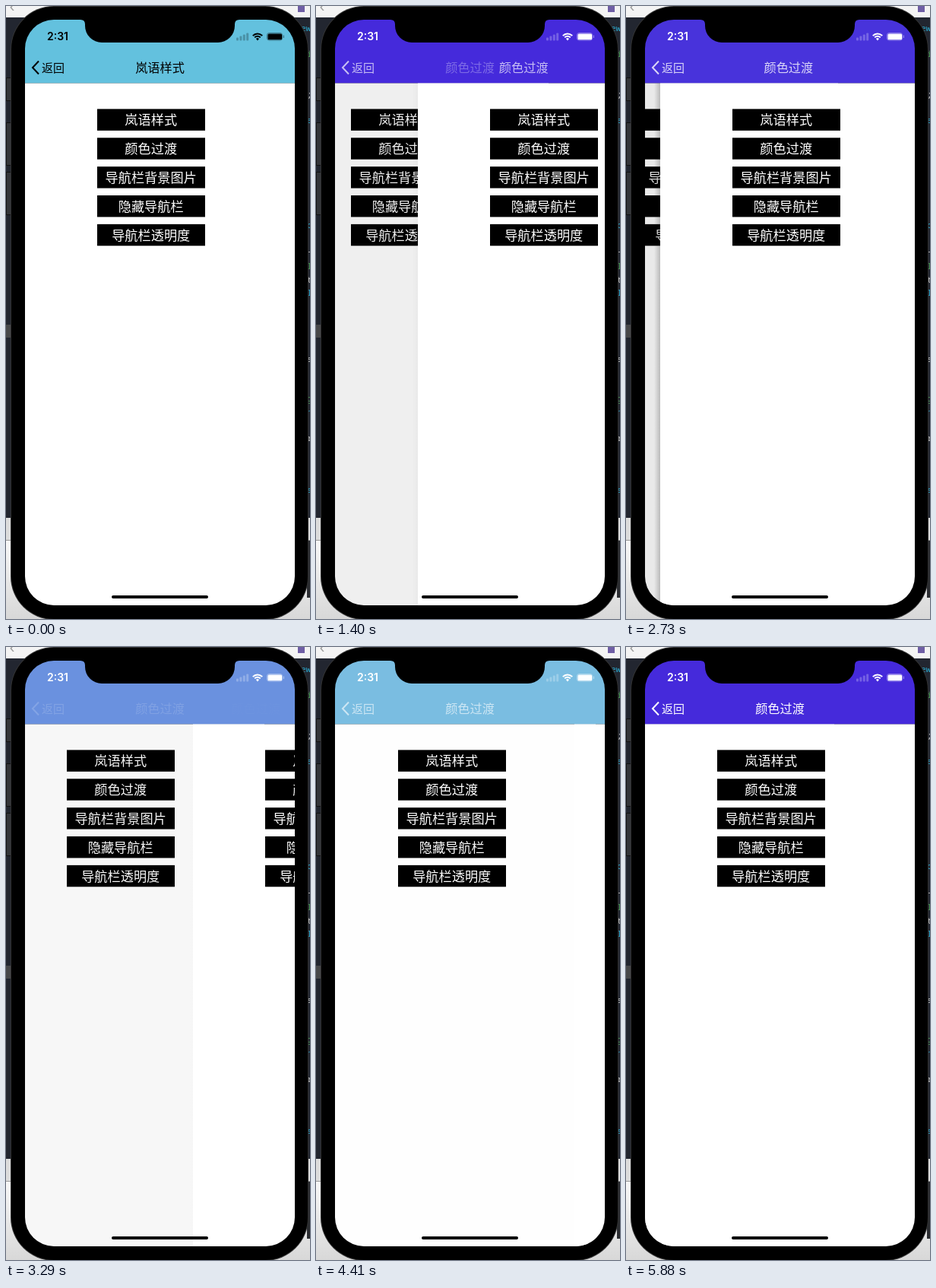
An HTML page with a canvas for the animation above (5.95 s loop, 400x806 px).

```html
<!DOCTYPE html>
<html lang="zh">
<head>
<meta charset="utf-8">
<style>
html, body { margin: 0; width: 100%; height: 100%; overflow: hidden; }
canvas { display: block; }
</style>
</head>
<body>
<canvas id="stage" width="400" height="806"></canvas>
<script>
const ctx = document.getElementById('stage').getContext('2d');
const LOOP = 5950, STEP = 70;
const LEFT = 25, TOP = 18, WIDTH = 355, HEIGHT = 770, BAR_END = 101.3;
const CJK = '"Noto Sans CJK SC", "Noto Sans CJK", sans-serif';
const CYAN = [99, 193, 222], PURPLE = [69, 42, 219], AQUA = [129, 208, 226];
const BLACK = [0, 0, 0], WHITE = [255, 255, 255];
const STYLE = '岚语样式', FADE = '颜色过渡';
const LABELS = [STYLE, FADE, '导航栏背景图片', '隐藏导航栏', '导航栏透明度'];
const PUSH_1 = 350, PUSH_2 = 1237, DRAG = 2520;
// time and progress of the back swipe
const SWIPE = [[DRAG, 0], [2730, .056], [3290, .622], [3600, .82], [4000, .95],
  [4410, .887], [4970, .287], [5250, .04], [5500, 0]];

const clamp = v => Math.max(0, Math.min(1, v));
const mix = (a, b, k) => a.map((v, i) => v + (b[i] - v) * k);
const rgb = (c, a = 1) => `rgba(${c.map(Math.round)},${a})`;
const pushLeft = (t, start) => (1 - clamp((t - start) / 500)) ** 3;

function swipe(t) {
  const n = SWIPE.length - 1;
  if (t >= SWIPE[n][0]) return 0;
  const i = SWIPE.findIndex(k => k[0] > t) - 1;
  const slope = j => j === 0 || j === n ? 0 :
    (SWIPE[j + 1][1] - SWIPE[j - 1][1]) / (SWIPE[j + 1][0] - SWIPE[j - 1][0]);
  const [t0, a] = SWIPE[i], [t1, b] = SWIPE[i + 1];
  const d = t1 - t0, u = (t - t0) / d, v = 1 - u;
  return clamp(a * (1 + 2 * u) * v * v + b * u * u * (3 - 2 * u) +
    d * u * v * (v * slope(i) - u * slope(i + 1)));
}

function rect(x, y, w, h, color) {
  ctx.fillStyle = color;
  ctx.fillRect(x, y, w, h);
}

function round(x, y, w, h, r, color) {
  ctx.beginPath();
  ctx.roundRect(x, y, w, h, r);
  ctx.fillStyle = color;
  ctx.fill();
}

function text(s, x, y, font, color, align = 'center') {
  ctx.font = font;
  ctx.textAlign = align;
  ctx.fillStyle = color;
  ctx.fillText(s, x, y);
}

function desktop() {
  rect(0, 0, 400, 806, '#222630');
  rect(0, 0, 400, 15, '#f4f4f4');
  rect(384, 0, 9, 8, '#6f5fa5');
  text('‹', 8, 7, '18px Inter, sans-serif', '#999');
  for (const [y, h] of [[94, 31], [153, 57], [218, 57]]) {
    rect(0, y, 8, h, '#111');
    rect(1, y + 1, 7, h - 2, '#34363a');
  }
  rect(0, 419, 8, 17, '#47484a');
  const code = [['ew', 33, '#2ba5c8'], ['i', 67, '#4a9a55'], [';', 120, '#ccc'], ['e', 154, '#2ba5c8'],
    ['c', 292, '#2ba5c8'], ['-', 326, '#bbb'], ['l', 346, '#4a9a55'], ['t', 364, '#ccc'], ['l', 381, '#2ba5c8'],
    ['s', 468, '#ccc'], ['g', 520, '#4a9a55'], ['n', 538, '#2ba5c8'], ['r', 572, '#bbb'],
    ['s', 640, '#2ba5c8']];
  for (const [s, y, color] of code)
    text(s, s.length > 1 ? 388 : 396, y, '11px "Noto Sans Mono", monospace', color, 'left');

  // light panel below the editor
  rect(0, 673, 400, 133, '#dcdcdc');
  rect(0, 702, 400, 1, '#999');
  const shade = ctx.createLinearGradient(0, 703, 0, 806);
  shade.addColorStop(0, '#f8f8f8');
  shade.addColorStop(1, '#d8d8d8');
  rect(0, 703, 400, 103, shade);
  rect(396, 703, 4, 75, '#2a2c30');
}

function page(left) {
  const x = Math.round(left);
  rect(x, BAR_END, WIDTH, 700, '#fff');
  LABELS.forEach((label, i) => {
    const y = 135.4 + 37.87 * i;
    rect(x + 95, y, 142, 28.4, '#000');
    text(label, x + 165.7, y + 20.7, '17.2px ' + CJK, '#fff');
  });
}

function status(color) {
  text('2:31', 54, 45, '600 14px Inter, sans-serif', rgb(color), 'left');
  for (let i = 0; i < 4; i++) {
    const h = 4 + 2 * i;
    round(303 + 4.4 * i, 45.5 - h, 3, h, 1, rgb(color, .25));
  }
  ctx.strokeStyle = rgb(color);
  ctx.lineWidth = 2;
  for (const r of [8.5, 5.2]) {
    ctx.beginPath();
    ctx.arc(331, 45, r, -Math.PI * .76, -Math.PI * .24);
    ctx.stroke();
  }
  ctx.beginPath();
  ctx.moveTo(331, 45.5);
  ctx.arc(331, 45, 2.8, -Math.PI * .76, -Math.PI * .24);
  ctx.fillStyle = rgb(color);
  ctx.fill();
  ctx.beginPath();
  ctx.roundRect(343.5, 35.5, 20, 9.5, 2.7);
  ctx.strokeStyle = rgb(color, .4);
  ctx.lineWidth = 1;
  ctx.stroke();
  round(344.5, 36.5, 18.5, 7.8, 1.5, rgb(color));
  rect(364.8, 38.5, 1.2, 3.5, rgb(color, .4));
}

function backButton(color, alpha) {
  ctx.strokeStyle = rgb(color, alpha);
  ctx.lineWidth = 2;
  ctx.beginPath();
  ctx.moveTo(43, 72.5);
  ctx.lineTo(35, 81);
  ctx.lineTo(43, 89.5);
  ctx.stroke();
  text('返回', 47, 86.5, '15px ' + CJK, rgb(color, alpha), 'left');
}

function sceneAt(t) {
  if (t >= DRAG) {
    const p = swipe(t), over = (1 - p) ** 4, under = p ** 4;
    return { p, over, under, back: over + under, shift: 203, from: FADE,
      bar: mix(PURPLE, AQUA, p), ink: WHITE, oldInk: WHITE, shadow: .25 };
  }
  const first = t < PUSH_2;
  const p = pushLeft(t, first ? PUSH_1 : PUSH_2);
  return { p, over: 1 - p, under: p, back: Math.max(p, 1 - p), shift: 231,
    from: first ? STYLE : FADE,
    bar: first ? mix(PURPLE, CYAN, p) : PURPLE,
    ink: first ? mix(WHITE, BLACK, p) : WHITE,
    oldInk: first ? BLACK : WHITE, shadow: .1 };
}

function draw(t) {
  const s = sceneAt(t), edge = Math.round(LEFT + s.p * WIDTH);
  desktop();
  round(6, 0, 392, 807, 57, '#333');
  round(7, 1, 390, 805, 56, '#000');

  ctx.save();
  ctx.beginPath();
  ctx.roundRect(LEFT, TOP, WIDTH, HEIGHT, 38);
  ctx.clip();
  page(LEFT - .3 * WIDTH * (1 - s.p));
  rect(LEFT, BAR_END, WIDTH, 700, rgb(BLACK, .1 * clamp(.93 - s.p)));
  if (s.p > 0) {
    const g = ctx.createLinearGradient(edge - 8, 0, edge, 0);
    g.addColorStop(0, rgb(BLACK, 0));
    g.addColorStop(1, rgb(BLACK, s.shadow * (1 - s.p) ** 4));
    rect(edge - 8, BAR_END, 8, 700, g);
  }
  page(edge);
  rect(LEFT, TOP, WIDTH, BAR_END - TOP, rgb(s.bar));
  const font = '500 16.2px ' + CJK;
  text(s.from, 202.5, 87, font, rgb(s.oldInk, s.under));
  text(FADE, 202.5 + s.shift * s.p, 87, font, rgb(s.ink, s.over));
  backButton(s.ink, s.back);
  status(s.ink);
  round(139, 775, 127, 4, 2, '#000');
  ctx.restore();

  // notch with flared top corners
  ctx.beginPath();
  ctx.moveTo(98, 17);
  ctx.lineTo(98, 18);
  ctx.quadraticCurveTo(104, 18, 104, 24);
  ctx.arcTo(104, 48, 126, 48, 22);
  ctx.arcTo(301, 48, 301, 26, 22);
  ctx.lineTo(301, 24);
  ctx.quadraticCurveTo(301, 18, 307, 18);
  ctx.lineTo(307, 17);
  ctx.fillStyle = '#000';
  ctx.fill();
}

const start = performance.now();
function tick() {
  const t = (performance.now() - start) % LOOP;
  draw(Math.floor(t / STEP) * STEP);
  requestAnimationFrame(tick);
}
tick();
</script>
</body>
</html>
```
